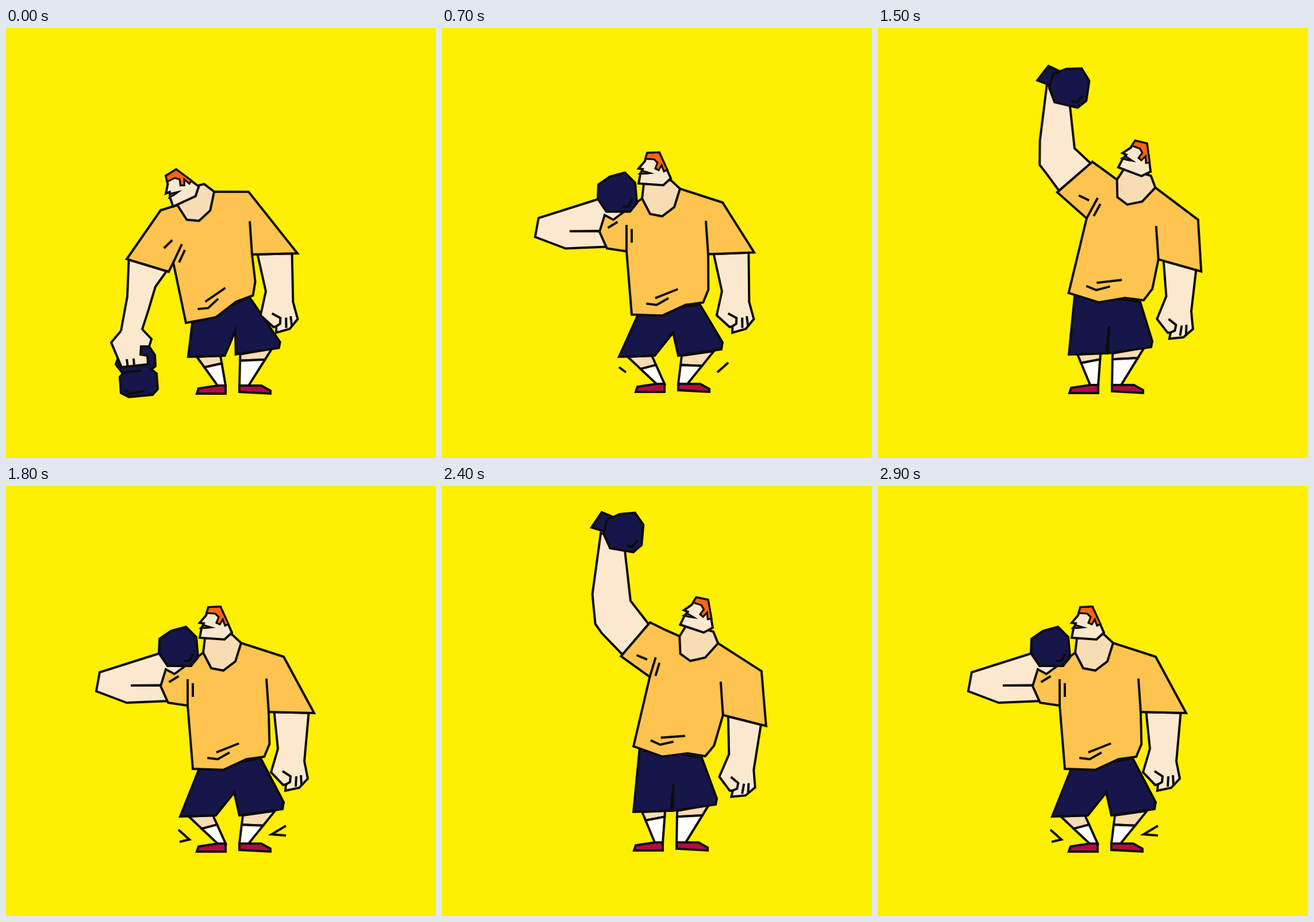
An HTML page with a canvas that plays this animation: 748x748 px, repeating every 3000 ms.

```html
<!DOCTYPE html>
<html lang="en">
<head>
<meta charset="utf-8">
<title>Kettlebell press</title>
<style>
  html, body { margin: 0; height: 100%; overflow: hidden; background: #ffef00; }
  canvas { display: block; }
</style>
</head>
<body>
<canvas id="stage" width="748" height="748"></canvas>
<script>
const ctx = document.getElementById('stage').getContext('2d');
const INK = '#0d0c0c', SKIN = '#fbe8ce', SHADE = '#f7dcb4', NAVY = '#16164a';
const SHIRT = '#ffc34f', HAIR = '#ff6410', LIP = '#c4651f', SHOE = '#b00d42';

const nums = s => s.match(/-?[\d.]+/g).map(Number);
const pairs = v => v.flatMap((n, i) => i % 2 ? [[v[i - 1], n]] : []);
const lerp = (a, b, t) => a.map((n, i) => n + (b[i] - n) * t);
const move = ([x, y], dx, dy) => [x + dx, y + dy];
const each = (pose, fn) => Object.fromEntries(Object.keys(pose).map(k => [k, fn(pose[k], k)]));
const mix = (a, b, t) => each(a, (v, k) => lerp(v, b[k], t));
const pose = parts => ({ shift: [0, 0], feet: [0, 0], bend: [0, 0], ...each(parts, nums) });

// Rigid parts are anchored by x, y, degrees and scale
function place(shape, [x, y, degrees = 0, scale = 1]) {
  const a = degrees * Math.PI / 180, c = Math.cos(a) * scale, s = Math.sin(a) * scale;
  return pairs(nums(shape)).map(([u, v]) => [x + u * c - v * s, y + u * s + v * c]);
}

// sleeve: shoulder, cuff top, cuff bottom, armpit, crease; cape: armpit, cuff, shoulder
// arm: outer wrist, three elbow points, inner elbow, inner wrist; bell ends with its reach
const low = pose({
  bend: '.5 .1', head: '296,246 -29', collar: '298,308 -5.5', hem: '313,513 -15 1',
  sleeve: '269,317 210,402 283,424 291,408 306,376', cape: '428,394 507,392 422,285',
  fist: '470,530 -4', arm: '237,524 248,490 256,463 260,450 211,467 200,527', bell: '202,510 13 1'
});
const rack = pose({
  bend: '1 1', head: '373,210 0', collar: '343,290 0', hem: '325,492 -2.3 1',
  sleeve: '293,327 278,319 282,377 316,382 316,336', cape: '457,393 536,395 483,297',
  fist: '486,530 0', arm: '280,287 163,324 157,357 210,377 217,347 271,347', bell: '300,281 0 0'
});
const half = pose({
  head: '389,199 1', collar: '356,276 4.5', hem: '330,479 0 1',
  sleeve: '320,278 285,281 276,344 325,355 327,322', cape: '468,387 544,405 509,293',
  fist: '466,527 11', arm: '243,230 168,283 171,319 196,327 251,283 276,258', bell: '300,240 13 1'
});
const high = pose({
  feet: '2,-2', head: '460,198 14', collar: '411,262 24', hem: '333,454 14.5 1',
  sleeve: '385,251 359,239 310,298 360,333 370,299', cape: '488,398 563,417 554,321',
  fist: '502,540 7', arm: '275,87 258,192 263,243 275,259 325,203 315,105', bell: '316,86 10 1'
});
const down = pose({
  head: '470,204 18', collar: '416,267 26.5', hem: '330,470 10 1.08',
  sleeve: '399,248 381,230 311,277 363,331 391,294', cape: '486,406 560,429 556,344',
  fist: '509,540 5', arm: '310,122 298,208 292,239 304,252 353,222 346,145', bell: '349,131 17 1'
});
const caught = { ...rack, shift: [5, 6.5], feet: [0, -9.5], fist: [500, 523.5, -4],
  cape: nums('458,387 538,384 483,297') };
const peak = mix(half, high, 1.08);

// Steps of 100 ms; the press happens twice
const REP = 11;
const press = [[11, half], [12, high], [14, peak], [16, down], [18, rack]];
const keys = [[0, low], [5, half], [7, caught], ...press, ...press.slice().map(([t, p]) => [t + REP, p])];
const marks = {
  7: ['308,590 320,599', '498,582 479,599'],
  11: ['210,345 243,365'],
  12: ['334,135 341,163', '282,291 284,320'],
  18: ['300,598 319,615 302,619', '487,591 462,606 487,608']
};

function path(points, fill, closed = true) {
  ctx.beginPath();
  points.forEach(p => ctx.lineTo(...p));
  if (closed) ctx.closePath();
  if (fill) { ctx.fillStyle = fill; ctx.fill(); }
  ctx.stroke();
}
const line = points => path(points, null, false);
const placedLine = (shape, anchor) => line(place(shape, anchor));

function drawLeg(outer, inner, heel, arch, bend) {
  const sockOuter = lerp(outer, heel, .28 + .17 * bend);
  const sockInner = lerp(inner, arch, .19 + .14 * bend);
  path([outer, inner, sockInner, sockOuter], SHADE);
  path([sockOuter, sockInner, arch, heel], '#fff');
}

function drawLower({ feet, bend: [left, right], hem }, waist) {
  const at = (x, y, x2, y2, bend) => move(lerp([x, y], [x2, y2], bend), ...feet);
  const foot = (x, y) => move([x, y], ...feet);
  drawLeg(at(346, 569, 318, 575, left), at(386, 567, 360, 573, left), foot(368, 622), foot(382, 622), left);
  drawLeg(at(462, 557, 468, 565, right), at(407, 567, 412, 573, right), foot(422, 622), foot(406, 622), right);
  path(place('332,636 335,627 368,622 382,622 382,636', feet), SHOE);
  path(place('406,633 406,622 444,622 460,631 460,636', feet), SHOE);
  path([move(waist[0], 11, 0), at(331, 569, 303, 575, left), at(396, 567, 365, 573, left),
    at(401, 520, 397, 533, left), at(399, 567, 406, 573, right), at(474, 556, 481, 562, right),
    at(476, 546, 483, 550, right), move(waist[3], -6, 3)], NAVY);
}

function drawFist(anchor, armpit, cuff) {
  path([lerp(armpit, cuff, .12), ...place('-13,-73 -25,-32 -4,-10 1,-11 0,0 24,-5 39,-21 33,-51', anchor),
    lerp(armpit, cuff, .88)], SKIN);
  ['-5,-34 9,-25 8,-15 1,-11', '19,-25 18,-7', '27,-27 28,-10'].forEach(s => placedLine(s, anchor));
}

function drawFolds([x, y], armpit, tilt, hem) {
  const along = Math.atan2(armpit[1] - y, armpit[0] - x) * 180 / Math.PI;
  line([[x, y], armpit]);
  placedLine('7,-9 31,-9', [x, y, along]);
  placedLine('-10,0 10,0', [x - 24, y, 2.2 * (tilt - 14.5)]);
  placedLine('42,-27 82,-41', hem);
  placedLine('26,-18 44,-15 65,-26', hem);
}

function drawHead(anchor) {
  path(place('-24,11 -25,15 -36,28 -29,29 -33,38 -36,54 7,57 20,45 0,0 -21,1', anchor), SKIN);
  ctx.lineWidth = 3.2;
  path(place('-34,37 -29,32 -16,36 -25,37', anchor), LIP);
  path(place('-24,11 -21,1 0,0 14,30 8,33 4,22 -1,31 -7,28 -3,18 -9,12', anchor), HAIR);
  ctx.lineWidth = 4;
}

function drawBall([x, y, turn, reach]) {
  const slide = 1 - reach, anchor = [x, y, turn];
  path(place('-44,-27 -57,2 -34,5 -26,-23', [x + 36 * slide, y + 6 * slide, turn]), NAVY);
  path(place('-33,-15 -13,-29 13,-36 31,-18 34,17 22,32 -19,32 -34,10', anchor), NAVY);
  placedLine('9,23 19,23 26,10', anchor);
}

// Origin at the wrist
function drawHangingBell(wrist) {
  path(place('-9,58 3,74 -2,80 0,108 14,115 55,111 64,101 62,74 53,67 60,61 59,42 49,27 34,28 34,41 46,43 48,58 1,63 -6,50', wrist), NAVY);
  path(place('0,0 -17,20 1,63 47,58 46,43 34,41 35,27 49,27 53,14 37,-3', wrist), SKIN, false);
  ['2,75 12,71 36,69', '6,102 15,109 41,104', '10,49 12,63', '22,48 23,61'].forEach(s => placedLine(s, wrist));
}

function drawFigure(p, step) {
  const collar = place('0,0 14,27 35,31 56,15 66,-17 50,-32 3,-25', p.collar);
  const hem = place('0,0 53,4 94,-13 125,-16 135,-38', p.hem);
  const [shoulder, cuffTop, cuffLow, armpit, crease] = pairs(p.sleeve);
  const [sideArmpit, sideCuff, sideShoulder] = pairs(p.cape);
  const [wrist, elbow1, elbow2, elbow3, innerElbow, innerWrist] = pairs(p.arm);
  const tuck = 11 * (1 - p.bell[3]);
  const cuff = move(lerp(cuffTop, cuffLow, .5), -tuck, 0);

  drawLower(p, hem);
  drawFist(p.fist, sideArmpit, sideCuff);
  path([wrist, elbow1, elbow2, elbow3, lerp(cuffLow, cuff, .1), lerp(cuffTop, cuff, tuck ? .95 : .1),
    innerElbow, innerWrist, move(p.bell, 16, 30)], SKIN);
  path([collar[0], shoulder, cuffTop, cuff, cuffLow, armpit, ...hem,
    sideArmpit, sideCuff, sideShoulder, collar[4]], SHIRT);
  drawFolds(crease, armpit, p.collar[2], p.hem);
  line([move(sideArmpit, -4, -58), sideArmpit]);
  path(collar, SHADE);
  drawHead(p.head);
  if (step < 4) drawHangingBell(innerWrist);
  else drawBall(p.bell);
}

function poseAt(step) {
  const i = Math.max(1, keys.findIndex(k => k[0] >= step));
  const [t0, a] = keys[i - 1], [t1, b] = keys[i];
  return mix(a, b, (step - t0) / (t1 - t0));
}

function render(now) {
  const step = Math.floor(now / 100) % 30, p = poseAt(step);
  ctx.fillStyle = '#ffef00';
  ctx.fillRect(0, 0, 748, 748);
  ctx.strokeStyle = INK;
  ctx.lineWidth = 4;
  ctx.miterLimit = 5;
  (marks[step > 18 ? step - REP : step] || []).forEach(s => placedLine(s, [0, 0]));
  ctx.save();
  ctx.translate(...p.shift);
  drawFigure(p, step);
  ctx.restore();
  requestAnimationFrame(render);
}
requestAnimationFrame(render);
</script>
</body>
</html>
```
